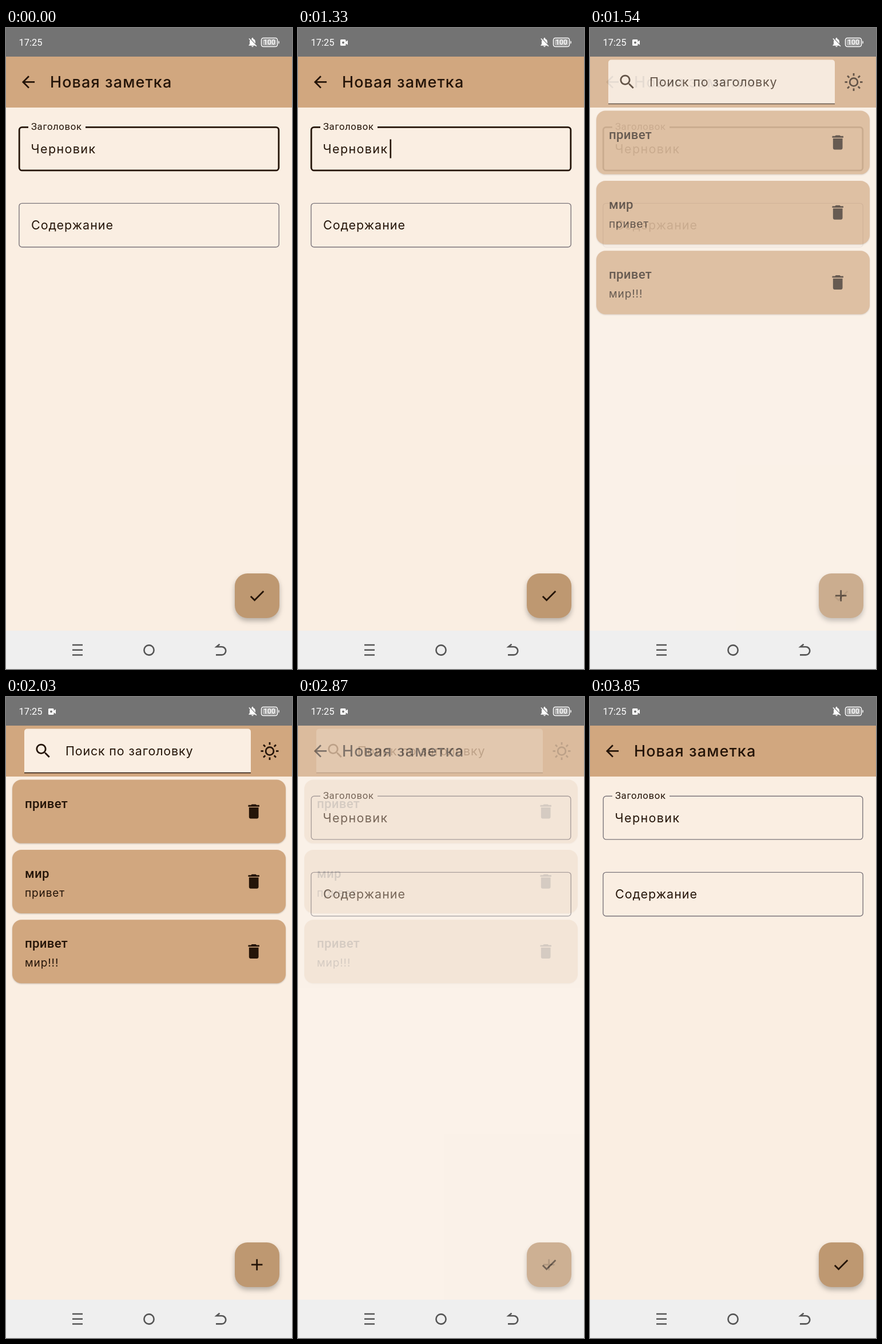
These frames come from a looping animation (500 px wide and 1120 px high, 3.92 s). An HTML page:

```html
<!DOCTYPE html>
<html lang="ru">
<head>
<meta charset="utf-8">
<title>Заметки</title>
<style>
  html, body { margin: 0; height: 100%; overflow: hidden; }
  svg { display: block; width: 100vw; height: 100vh; }
  text { font: 400 21.5px Inter, sans-serif; }
  .roboto { font-family: Roboto, sans-serif; }
  .title { font-size: 27px; font-weight: 500; letter-spacing: 1.1px; }
  .label { font-size: 16.7px; letter-spacing: .7px; }
  .heading { font-size: 22.2px; font-weight: 500; letter-spacing: .25px; }
  .body { font-size: 19px; letter-spacing: .9px; }
  .fab { fill: #be9871; filter: drop-shadow(0 5px 4px #0004); }
  .card { fill: #d1a77f; filter: drop-shadow(0 1px 1.2px #0003); }
  .outline { fill: none; stroke: #7b757b; stroke-width: 1.4; }
  .outline.focused { stroke: #241408; stroke-width: 2.8; }
  .line { fill: none; stroke: #555; stroke-width: 2.6; }
</style>
</head>
<body>
<svg viewBox="0 0 500 1120" preserveAspectRatio="none" fill="#241408">
  <defs>
    <g id="backdrop">
      <rect y="50" width="500" height="1003" fill="#faeee2"/>
      <rect y="50" width="500" height="89" fill="#d1a77f"/>
      <rect class="fab" x="400" y="953" width="78" height="78" rx="22"/>
    </g>
    <path id="trash" d="M6 19c0 1.1.9 2 2 2h8c1.1 0 2-.9 2-2V7H6v12zM19 4h-3.5l-1-1h-5l-1 1H5v2h14V4z"/>
  </defs>

  <rect width="500" height="1120" fill="#fff"/>
  <g id="screens">
    <g id="note">
      <use href="#backdrop"/>
      <path transform="translate(22.3 77.8) scale(1.39)" d="M20 11H7.83l5.59-5.59L12 4l-8 8 8 8 1.41-1.41L7.83 13H20v-2z"/>
      <text class="title" x="77" y="104">Новая заметка</text>
      <rect id="field" class="outline" x="23.2" y="173.3" width="453.6" height="75.6" rx="5"/>
      <path fill="#faeee2" d="M39 168h100v12H39z"/>
      <text class="roboto label" x="44" y="178">Заголовок</text>
      <text x="43.5" y="219" letter-spacing="1.4">Черновик</text>
      <path id="cursor" d="M160.5 194.5h2.6v33h-2.6z"/>
      <rect class="outline" x="22.9" y="306.4" width="454.3" height="76.4" rx="5"/>
      <text x="44" y="352" letter-spacing="1">Содержание</text>
      <path transform="translate(422.1 975.3) scale(1.39)" d="M9 16.17L4.83 12l-1.42 1.41L9 19 21 7l-1.41-1.41z"/>
    </g>
    <g id="list">
      <use href="#backdrop"/>
      <path fill="#faeee2" d="M32 133V61q0-5.500 5.500-5.500h385q5.500 0 5.500 5.500v72z"/>
      <path d="M32 131.800h396v1.400H32z"/>
      <path transform="translate(48.3 77.5) scale(1.39)" d="M15.500 14h-.79l-.28-.27C15.410 12.590 16 11.110 16 9.500 16 5.910 13.090 3 9.500 3S3 5.910 3 9.500 5.910 16 9.500 16c1.610 0 3.090-.59 4.230-1.570l.27.28v.79l5 4.990L20.490 19l-4.990-5zm-6 0C7.010 14 5 11.990 5 9.500S7.010 5 9.500 5 14 7.010 14 9.500 11.990 14 9.500 14z"/>
      <text x="104" y="102" letter-spacing=".8">Поиск по заголовку</text>
      <g id="sun" transform="translate(461 94.5)" fill="none" stroke="#241408" stroke-width="2.8">
        <circle r="6.9"/>
      </g>
      <g id="cards"></g>
      <path transform="translate(422 975.3) scale(1.39)" d="M19 13h-6v6h-2v-6H5v-2h6V5h2v6h6v2z"/>
    </g>
  </g>

  <rect width="500" height="50" fill="#737373"/>
  <g fill="#fff">
    <text class="roboto" x="22.5" y="31" style="font-size:16.5px">17:25</text>
    <path id="camera" fill-rule="evenodd" d="M75.500 20h6.500q1.500 0 1.500 1.500v2.500l3.500-2.500v8l-3.500-2.500v2.500q0 1.500-1.500 1.500h-6.500q-1.500 0-1.500-1.500v-8q0-1.500 1.500-1.500zM77 25.500a2 2 0 1 0 4 0 2 2 0 1 0-4 0z"/>
    <path transform="translate(421 15) scale(.83)" d="M20 18.690L7.840 6.140 5.270 3.490 4 4.760l2.800 2.800c-.52 1-.8 2.170-.8 3.430v5l-2 2v1h13.730l2 2L21 19.720zM12 22c1.110 0 2-.89 2-2h-4c0 1.110.89 2 2 2zm6-7.320V11c0-3.080-1.640-5.640-4.500-6.320V4c0-.83-.67-1.500-1.500-1.500s-1.500.67-1.500 1.500v.68q-.8.200-1.440.550z"/>
    <rect x="446.500" y="17.500" width="28" height="15" rx="3.500" fill="none" stroke="#fff" stroke-width="1.500"/>
    <rect x="448.700" y="19.600" width="23.600" height="10.800" rx="2" fill="#aaa"/>
    <path d="M476.300 22.500q1.500 0 1.500 1.500v2q0 1.500-1.500 1.500z"/>
    <text class="roboto" x="460.500" y="29.300" text-anchor="middle" style="font-size:12px;font-weight:500">100</text>
  </g>
  <rect y="1053" width="500" height="67" fill="#efefef"/>
  <path class="line" d="M116 1078h18M116 1086.700h18M116 1095.500h18"/>
  <circle class="line" cx="250" cy="1087" r="8.600"/>
  <path class="line" d="M373.500 1076.800L368 1081.200h9.200a7.100 7.100 0 0 1 0 14.200H367"/>
</svg>
<script>
const $ = id => document.getElementById(id);
const LOOP = 3920, FADE = 700;
// Each crossfade starts unseen and first shows once the new screen is ready.
const TO_LIST = { start: 1233, shown: 1470 };
const TO_NOTE = { start: 2602, shown: 2870 };

for (let i = 0; i < 8; i++) {
  $('sun').innerHTML += `<path d="M0-11v-4.500" transform="rotate(${i * 45})"/>`;
}

const notes = [['привет', ''], ['мир', 'привет'], ['привет', 'мир!!!']];
$('cards').innerHTML = notes.map(([heading, body], i) => `
  <g transform="translate(0 ${144.6 + i * 122.3})">
    <rect class="card" x="11" width="478" height="111" rx="16"/>
    <text class="roboto heading" x="33" y="49">${heading}</text>
    <text class="body" x="33" y="82">${body}</text>
    <use href="#trash" transform="translate(416.500 38.700) scale(1.39)"/>
  </g>`).join('');

const clamp = v => Math.min(1, Math.max(0, v));

// cubic-bezier(.4, 0, .2, 1)
function ease(x) {
  let low = 0, high = 1, s;
  for (let i = 0; i < 20; i++) {
    s = (low + high) / 2;
    const at = 1.2 * (1 - s) ** 2 * s + .6 * (1 - s) * s * s + s ** 3;
    if (at < x) low = s; else high = s;
  }
  return s * s * (3 - 2 * s);
}

const progress = (t, { start, shown }) => {
  const x = t < shown ? 0 : clamp((t - start) / FADE);
  return x === 0 || x === 1 ? x : ease(x);
};

function crossfade(from, to, amount) {
  if ($('screens').lastElementChild !== to) $('screens').append(to);
  from.style.opacity = 1 - amount;
  to.style.opacity = amount;
}

function draw(now) {
  const t = now % LOOP;
  if (t < TO_NOTE.shown) crossfade($('note'), $('list'), progress(t, TO_LIST));
  else crossfade($('list'), $('note'), progress(t, TO_NOTE));

  $('field').classList.toggle('focused', t < TO_NOTE.shown);
  const cursorOn = t >= 70 && t < 560 || t >= 1050 && t < TO_LIST.shown;
  $('cursor').style.opacity = cursorOn ? 1 : 0;
  $('camera').style.opacity = clamp((t - 70) / 210);
  requestAnimationFrame(draw);
}
requestAnimationFrame(draw);
</script>
</body>
</html>
```
